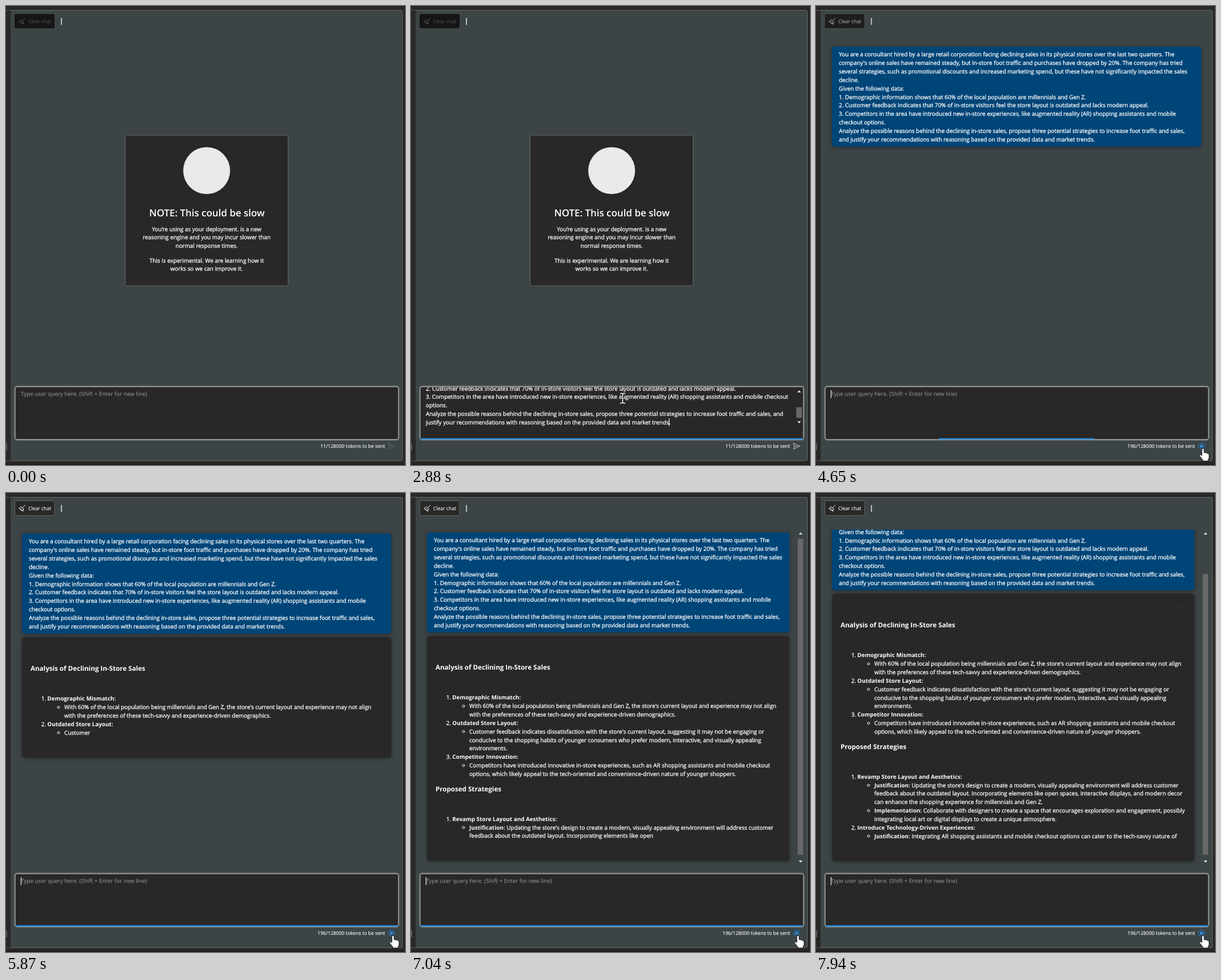
An HTML page that plays this animation: 698 px wide and 803 px high, repeating every 8000 ms.

```html
<!DOCTYPE html>
<html lang="en">
<head>
<meta charset="utf-8">
<title>Chat playground</title>
<style>
html, body { margin: 0; width: 100%; height: 100%; overflow: hidden; background: #292827; }
svg { display: block; width: 698px; height: 803px; }
text { font: 400 9.9px "Open Sans", "Noto Sans", sans-serif; fill: #fff; stroke: #fff; stroke-width: .3px; white-space: pre; text-rendering: geometricPrecision; }
.bold { font-weight: 700; stroke: none; }
.head { font-size: 11.6px; font-weight: 700; stroke: none; }
.title { font-size: 16.9px; font-weight: 600; stroke: none; }
.small { font-size: 8.55px; stroke-width: .12px; }
.mid { text-anchor: middle; }
.end { text-anchor: end; }
.hint { font-size: 9.85px; fill: #a09e9c; stroke: none; }
.off { fill: #5c5a58; stroke: none; }
.icon { fill: none; stroke: #fff; stroke-linejoin: round; stroke-linecap: round; }
.thumb { fill: #686868; }
.shade { filter: drop-shadow(0 1px 3px rgba(0, 0, 0, .35)); }
.glow { filter: drop-shadow(0 0 1.5px rgba(255, 255, 255, .45)); }
</style>
</head>
<body>
<svg viewBox="0 0 698 803">
  <defs>
    <clipPath id="view"><rect x="9" y="64" width="684" height="587"/></clipPath>
    <clipPath id="field"><rect x="17" y="667" width="668" height="88"/></clipPath>
    <path id="broom" d="M33.5 21.5 29.6 25.6M27 24.3 31 28.2 29.5 32 23 27.2ZM25.5 29 27 27.2M28 30.8 29 29"/>
    <path id="plane" d="M669 764.8 680.5 770 669 775.2 670.8 770ZM670.8 770H676"/>
    <path id="ibeam" d="M-4.500-8.500H-1.500L0-7.500 1.500-8.500H4.500M0-7.500V7.500M-4.500 8.500H-1.500L0 7.500 1.500 8.500H4.500"/>
  </defs>

  <rect width="698" height="803" fill="#292827"/>
  <path d="M0 7.5H9M0 795.5H9" stroke="#5b5a59"/>
  <rect x="8" y="7" width="686" height="789" rx="3" fill="#3c4446"/>
  <path d="M8 7.5H690.500Q693.500 7.500 693.500 10.500V792.500Q693.500 795.500 690.500 795.500H8" fill="none" stroke="#636667"/>
  <rect y="765" width="2" height="12" fill="#55595a"/>
  <rect y="801" width="698" height="2" fill="#1d1c1c"/>

  <rect x="15" y="14" width="70" height="25" rx="3" fill="#151515"/>
  <use href="#broom" class="icon" style="stroke:#5c5a58"/>
  <text class="small off" x="39" y="30.300">Clear chat</text>
  <g id="clear">
    <rect x="15.500" y="13.500" width="69.500" height="26" rx="3" fill="#292827" stroke="#666563"/>
    <use href="#broom" class="icon"/>
    <text class="small" x="39" y="30.300">Clear chat</text>
  </g>
  <rect x="96.300" y="21" width="1.400" height="12" fill="#eee"/>

  <g id="note">
    <rect x="208.500" y="226" width="285" height="263.500" rx="3" fill="#282828" stroke="#686868"/>
    <circle cx="351" cy="288" r="41" fill="#ebeae9"/>
    <text class="title mid" x="351.500" y="368">NOTE: This could be slow</text>
  </g>

  <g clip-path="url(#view)">
    <g id="chat">
      <g id="ask"><rect id="bubble" class="shade" x="28" y="71" width="646" height="175" rx="5" fill="#004578"/></g>
      <g id="reply">
        <rect id="card" class="shade" x="28" y="252" width="646" rx="5" fill="#292828"/>
        <path id="dots" d="M0 275.500h1.500m2 0h1.500m2 0h1.500"/>
        <g id="answer"></g>
      </g>
    </g>
  </g>
  <g id="bar">
    <path d="M678.500 72.500 681.500 69 684.500 72.500ZM678.500 643 681.500 646.500 684.500 643Z" fill="#fff"/>
    <rect id="thumb" class="thumb" x="676.500" width="9.500"/>
  </g>

  <rect class="glow" x="16" y="666" width="670.500" height="92.300" rx="3.500" fill="#292828" stroke="#a3a2a1" stroke-width="1.300"/>
  <path d="M18 758.800H685" stroke="#b4b3b2"/>
  <text id="hint" class="hint" x="26" y="682.300">Type user query here. (Shift + Enter for new line)</text>
  <g id="typed" clip-path="url(#field)">
    <path d="M676 676 679 672.500 682 676ZM676 726.500 679 730 682 726.500Z" fill="#fff"/>
    <rect class="thumb" x="674" y="702" width="10" height="18.500"/>
  </g>
  <rect id="line" y="756" height="2.300" fill="#157fd4"/>
  <rect id="caret" width="1.100" height="14" fill="#fff"/>

  <text id="tokens" class="small end" x="663" y="772.800"></text>
  <use id="send" href="#plane" class="icon"/>
  <g id="stop">
    <circle cx="674.500" cy="770" r="5.500" fill="none" stroke="#1777c4" stroke-width="1.200"/>
    <rect x="672" y="767.500" width="5" height="5" rx=".8" fill="#2b8ddb"/>
  </g>

  <g id="cursor">
    <g id="beam" fill="none">
      <use href="#ibeam" stroke="#222" stroke-width="3"/>
      <use href="#ibeam" stroke="#fff" stroke-width="1.500"/>
    </g>
    <path id="arrow" d="M0 0V16L3.700 12.600 6 18 8.600 16.900 6.300 11.600H11.300Z" fill="#fff" stroke="#111"/>
    <path id="hand" d="M-2 1.500Q-2-.5 0-.5T2 1.500V7Q4 5.800 5 7.600 7 6.600 8 8.500 10.500 7.800 10.700 10.500V15Q10.500 17.500 9 19V21.500H-.5V19.500L-6 12.500Q-6.500 10.300-4.300 10.300L-2 12Z" fill="#fff" stroke="#111"/>
  </g>
</svg>

<script>
const LOOP = 8000, PITCH = 14.84;
const $ = id => document.getElementById(id);
const show = (id, on) => $(id).setAttribute("display", on ? "inline" : "none");
const set = (id, attrs) => { for (const k in attrs) $(id).setAttribute(k, attrs[k]); };
const clamp = v => Math.min(1, Math.max(0, v));

function add(parent, tag, attrs) {
  const el = document.createElementNS("http://www.w3.org/2000/svg", tag);
  for (const k in attrs) el.setAttribute(k, attrs[k]);
  return parent.appendChild(el);
}
const write = (parent, x, y, str, cls = "") =>
  add(parent, "text", { x, y: y + 3.3, class: cls }).textContent = str;

["You’re using as your deployment. is a new",
 "reasoning engine and you may incur slower than",
 "normal response times.",
 "This is experimental. We are learning how it",
 "works so we can improve it."
].forEach((s, i) => write($("note"), 351, 390.3 + i * PITCH + (i > 2 ? 10.5 : 0), s, "mid"));

["You are a consultant hired by a large retail corporation facing declining sales in its physical stores over the last two quarters. The",
 "company's online sales have remained steady, but in-store foot traffic and purchases have dropped by 20%. The company has tried",
 "several strategies, such as promotional discounts and increased marketing spend, but these have not significantly impacted the sales",
 "decline.",
 "Given the following data:",
 "1. Demographic information shows that 60% of the local population are millennials and Gen Z.",
 "2. Customer feedback indicates that 70% of in-store visitors feel the store layout is outdated and lacks modern appeal.",
 "3. Competitors in the area have introduced new in-store experiences, like augmented reality (AR) shopping assistants and mobile",
 "checkout options.",
 "Analyze the possible reasons behind the declining in-store sales, propose three potential strategies to increase foot traffic and sales,",
 "and justify your recommendations with reasoning based on the provided data and market trends."
].forEach((s, i) => write($("ask"), 40, 85 + i * PITCH, s));

["2. Customer feedback indicates that 70% of in-store visitors feel the store layout is outdated and lacks modern appeal.",
 "3. Competitors in the area have introduced new in-store experiences, like augmented reality (AR) shopping assistants and mobile checkout",
 "options.",
 "Analyze the possible reasons behind the declining in-store sales, propose three potential strategies to increase foot traffic and sales, and",
 "justify your recommendations with reasoning based on the provided data and market trends."
].forEach((s, i) => write($("typed"), 26, 669.2 + i * PITCH, s));

// Prefixes: "#" heading, "1." numbered title, "o" bullet, none for a wrapped line
const answer = [
  "# Analysis of Declining In-Store Sales",
  "1. **Demographic Mismatch:**",
  "o With 60% of the local population being millennials and Gen Z, the store's current layout and experience may not align",
  "  with the preferences of these tech-savvy and experience-driven demographics.",
  "2. **Outdated Store Layout:**",
  "o Customer feedback indicates dissatisfaction with the store's current layout, suggesting it may not be engaging or",
  "  conducive to the shopping habits of younger consumers who prefer modern, interactive, and visually appealing",
  "  environments.",
  "3. **Competitor Innovation:**",
  "o Competitors have introduced innovative in-store experiences, such as AR shopping assistants and mobile checkout",
  "  options, which likely appeal to the tech-oriented and convenience-driven nature of younger shoppers.",
  "# Proposed Strategies",
  "1. **Revamp Store Layout and Aesthetics:**",
  "o **Justification:** Updating the store's design to create a modern, visually appealing environment will address customer",
  "  feedback about the outdated layout. Incorporating elements like open spaces, interactive displays, and modern decor",
  "  can enhance the shopping experience for millennials and Gen Z.",
  "o **Implementation:** Collaborate with designers to create a space that encourages exploration and engagement, possibly",
  "  integrating local art or digital displays to create a unique atmosphere.",
  "2. **Introduce Technology-Driven Experiences:**",
  "o **Justification:** Integrating AR shopping assistants and mobile checkout options can cater to the tech-savvy nature of"
].map((raw, i) => {
  const [, mark, body] = raw.match(/^(#|\d\.|o| ) (.*)$/);
  const y = i === 0 ? 308 : i < 11 ? 360 + (i - 1) * PITCH : i === 11 ? 521 : 572.4 + (i - 12) * PITCH;
  return { mark, body, y };
});

// time, last line, characters of it, scroll offset
const stream = [
  [5550, 0, 21, 0], [5630, 1, 24, 0], [5710, 2, 62, 0], [5790, 3, 50, 0], [5870, 5, 8, 0],
  [6060, 5, 82, 0], [6120, 6, 25, 0], [6270, 6, 90, 0], [6340, 8, 25, 0], [6520, 10, 45, 0],
  [6890, 11, 19, 0], [6960, 13, 60, 0], [7040, 14, 68, 2],
  [7370, 15, 40, 12], [7450, 16, 75, 22], [7530, 17, 60, 36], [7590, 18, 11, 44],
  [7670, 18, 43, 58], [7740, 18, 43, 61], [7860, 19, 70, 70], [7940, 19, 200, 76]
];

function drawLine({ mark, body, y }, count) {
  const box = $("answer"), str = body.slice(0, count);
  if (mark === "#") return write(box, 43, y, str, "head");
  const titled = /\d/.test(mark);
  if (titled) write(box, 61.8, y, mark);
  if (mark === "o") add(box, "circle", { cx: 91.8, cy: y, r: 1.9, class: "icon" });
  const el = add(box, "text", { x: titled ? 72.3 : 102, y: y + 3.3 });
  str.split(/\*\*(.+?)\*\*/).forEach((part, i) =>
    add(el, "tspan", { class: i % 2 ? "bold" : "" }).textContent = part);
}

let shown = -2;
function drawReply(t) {
  const step = stream.filter(s => s[0] <= t).length - 1;
  if (step === shown) return;
  shown = step;
  show("reply", step >= 0);
  const [, last, count, scroll] = stream[Math.max(step, 0)];
  const bottom = answer[last].y + 44, max = Math.max(0, bottom - 644);
  const wide = max ? 634 : 646;
  $("answer").replaceChildren();
  if (step >= 0) answer.slice(0, last + 1).forEach((l, i) => drawLine(l, i < last ? 999 : count));
  set("bubble", { width: wide });
  set("card", { width: wide, height: bottom - 252 });
  set("dots", { transform: `translate(${wide - 3} 0)`, stroke: t >= 7530 && t < 7670 ? "#7d7c7b" : "#22517a" });
  set("chat", { transform: `translate(0 ${-scroll})` });
  show("bar", step >= 0 && max > 0);
  const unit = 555 / (586 + max);
  set("thumb", { y: 78 + scroll * unit, height: 586 * unit });
}

// time, x, y
const path = [
  [600, 482, 772], [760, 440, 745], [920, 392, 712], [1060, 354, 694], [1180, 356, 687], [1320, 370, 686],
  [2880, 370, 686], [3050, 420, 708], [3220, 515, 748], [3400, 600, 782], [3550, 636, 790],
  [3790, 636, 790], [3900, 662, 786], [4020, 680, 778], [4170, 680, 778], [4250, 677, 774.5]
];
function drawCursor(t) {
  show("cursor", t > 600);
  let i = path.findIndex(p => p[0] > t);
  if (i < 0) i = path.length;
  const a = path[Math.max(0, i - 1)], b = path[Math.min(i, path.length - 1)];
  const p = b[0] > a[0] ? (t - a[0]) / (b[0] - a[0]) : 0;
  const x = a[1] + (b[1] - a[1]) * p, y = a[2] + (b[2] - a[2]) * p;
  set("cursor", { transform: `translate(${x} ${y})` });
  const inField = y < 759, onSend = x > 668;
  show("beam", inField);
  show("hand", !inField && onSend);
  show("arrow", !inField && !onSend);
}

const blinks = [[1430, 1940], [2410, 2940], [3470, 4000], [4600, 5170], [5690, 6270], [6740, 7370], [7800, LOOP]];
const grow = p => 1 - (1 - clamp(p)) ** 2;

function drawField(t) {
  const typed = t >= 2410 && t < 4410, sent = t >= 4410;
  show("typed", typed);
  show("hint", !typed);
  const w = 668 * (sent ? grow((t - 4605) / 200) : grow((t - 1400) / 200));
  set("line", { x: 351 - w / 2, width: w });
  show("caret", blinks.some(([a, b]) => t >= a && t < b));
  set("caret", typed ? { x: 451, y: 721 } : { x: 25.8, y: 672 });
  $("tokens").textContent = (t >= 4480 ? 196 : 11) + "/128000 tokens to be sent";
  show("send", !sent);
  $("send").style.stroke = typed ? "#c3c6c7" : "#5d6466";
  show("stop", sent);
}

function draw(t) {
  set("note", { opacity: 1 - clamp((t - 4400) / 240) });
  set("clear", { opacity: clamp((t - 4480) / 340) });
  show("ask", t >= 4480);
  drawReply(t);
  drawField(t);
  drawCursor(t);
}

function tick() {
  draw(performance.now() % LOOP);
  requestAnimationFrame(tick);
}
tick();
</script>
</body>
</html>
```
